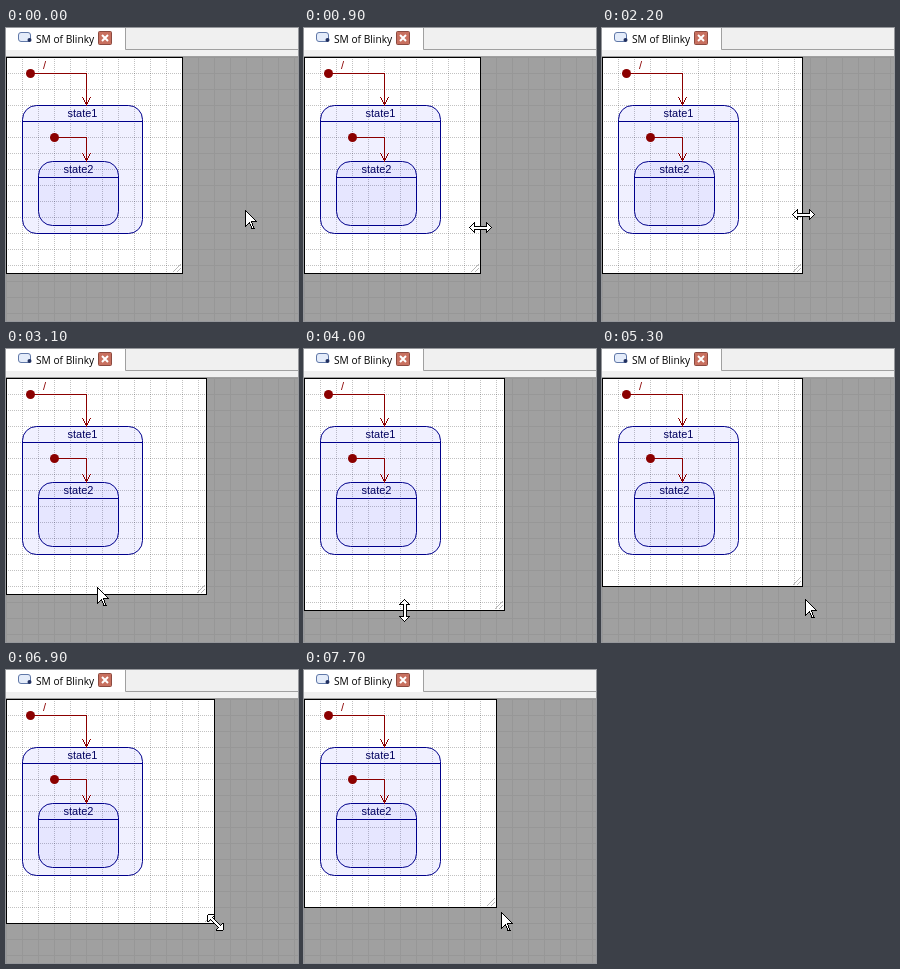
These frames come from a looping animation (292x293 px, 7.8 s). An HTML page:

```html
<!DOCTYPE html>
<html lang="en">
<head>
<meta charset="utf-8">
<title>Resizing a state diagram</title>
<style>
  html, body { margin: 0; width: 100%; height: 100%; overflow: hidden; background: #fff; }
  svg { display: block; width: 292px; height: 293px; }
  text { font: 11px "Liberation Sans", Arial, sans-serif; }
  .tab text { font: 10.2px "Open Sans", sans-serif; }
  .crisp, .cursor, .flow { shape-rendering: crispEdges; }
  .state { fill: #00f; fill-opacity: .06; stroke: #00008b; }
  .inner { fill-opacity: .045; }
  .rule { stroke: #00008b; }
  .name { fill: #000060; text-anchor: middle; }
  .flow { fill: none; stroke: #8b0000; }
  .start { fill: #8b0000; }
  .cursor { fill: #fff; stroke: #000; }
  .grid { stroke: #000; stroke-opacity: .24; stroke-dasharray: 1 1; }
</style>
</head>
<body>
<svg viewBox="0 0 292 293">
  <defs>
    <pattern id="dots" y="29" width="16" height="16" patternUnits="userSpaceOnUse">
      <g class="grid crisp"><path d="M0 .5H16"/><path d="M.5 0V16"/></g>
    </pattern>
    <pattern id="lines" y="29" width="16" height="16" patternUnits="userSpaceOnUse">
      <path class="crisp" d="M0 .5H16M.5 0V16" stroke="#000" stroke-opacity=".06"/>
    </pattern>
    <path id="double" d="M-11 0L-6 -5V-1.5H6V-5L11 0L6 5V1.5H-6V5Z"/>
  </defs>

  <g class="tab">
    <rect width="292" height="28" fill="#f0f0f0"/>
    <rect width="119" height="22" fill="#fff"/>
    <path d="M119.5 0V21.5H292" fill="none" stroke="#a0a0a0"/>
    <rect x="12.5" y="4.5" width="12" height="9" rx="2.5" fill="#e4ecfa" stroke="#6078a8"/>
    <circle cx="23.5" cy="12" r="2" fill="#203060"/>
    <text x="30" y="14.5">SM of Blinky</text>
    <rect x="92.5" y="3.5" width="13" height="13" rx="1" fill="#c8705f" stroke="#8c4a40"/>
    <path d="M96 7l6 6M102 7l-6 6" stroke="#fff" stroke-width="2"/>
  </g>

  <rect y="28" width="292" height="265" fill="#a0a0a0"/>
  <rect y="29" width="292" height="264" fill="url(#lines)"/>
  <rect class="sheet" y="29" fill="#fff"/>
  <rect class="sheet" y="29" fill="url(#dots)"/>
  <rect class="sheet crisp" x=".5" y="29.5" fill="none" stroke="#000"/>
  <path id="grip" d="M-9 -1L-1 -9M-5 -1L-1 -5" stroke="#b8b8b8"/>

  <rect class="state" x="16.5" y="77.5" width="120" height="128" rx="14"/>
  <path class="rule" d="M16.5 93.5H136.5"/>
  <text class="name" x="76.5" y="89">state1</text>
  <rect class="state inner" x="32.5" y="133.5" width="80" height="64" rx="14"/>
  <path class="rule" d="M32.5 149.5H112.5"/>
  <text class="name" x="72.5" y="145">state2</text>

  <path class="flow" d="M24.5 45.5H80.5V77M76.5 69L80.5 77L84.5 69"/>
  <circle class="start" cx="24.5" cy="45.5" r="4.5"/>
  <text class="start" x="37" y="41">/</text>
  <path class="flow" d="M48.5 109.5H80.5V133M76.5 125L80.5 133L84.5 125"/>
  <circle class="start" cx="48.5" cy="109.5" r="4.5"/>

  <g id="pointer" class="cursor">
    <path data-kind="arrow" d="M.5 .5V16.5L4.5 12.5L7 18.5H9L6.5 11.5H11.5Z"/>
    <use data-kind="ew" href="#double" x=".5" y=".5"/>
    <use data-kind="ns" href="#double" transform="translate(.5 .5) rotate(90)"/>
    <use data-kind="nwse" href="#double" transform="translate(.5 1.5) rotate(45)"/>
  </g>
</svg>
<script>
const LOOP = 7800, TICK = 100, TOP = 29, CELL = 8;

// Each leg runs between two ticks to a point. A travel leg shows the arrow
// until it arrives; a drag keeps its grip and resizes the named axes.
const legs = [
  { from: 1, to: 9, x: 176, y: 199, grip: "ew", bow: -12 },
  { from: 12, to: 17, x: 245, y: 180, grip: "ew", drag: "x" },
  { from: 18, to: 23, x: 198, y: 186, grip: "ew", drag: "x" },
  { from: 24, to: 34, x: 100, y: 246, grip: "ns", bow: -17, back: 1.9 },
  { from: 37, to: 42, x: 100, y: 266, grip: "ns", drag: "y" },
  { from: 43, to: 46, x: 99, y: 234, grip: "ns", drag: "y" },
  { from: 49, to: 57, x: 200, y: 236, grip: "nwse", bow: 14, back: 1.2 },
  { from: 59, to: 67, x: 228, y: 266, grip: "nwse", drag: "xy", back: -.2 },
  { from: 67, to: 72, x: 189, y: 236, grip: "nwse", drag: "xy" },
  { from: 75, to: 77, x: 197, y: 242, grip: "arrow" }
];

const snap = v => CELL * Math.round(v / CELL);

// Slows towards the end; a positive back overshoots
function ease(k, back) {
  const u = k - 1;
  return 1 + (back + 1) * u ** 3 + back * u ** 2;
}

function poseAt(tick) {
  const pose = { x: 239, y: 182, w: 176, h: 216, kind: "arrow" };
  for (const { from, to, x, y, grip, drag = "", bow = 0, back = -2 } of legs) {
    if (tick <= from) break;
    const k = Math.min(1, (tick - from) / (to - from));
    const e = ease(k, back);
    pose.x += (x - pose.x) * e;
    pose.y += (y - pose.y) * e + bow * Math.sin(Math.PI * k);
    pose.kind = drag || k === 1 ? grip : "arrow";
    if (drag.includes("x")) pose.w = snap(pose.x);
    if (drag.includes("y")) pose.h = snap(pose.y - TOP);
  }
  return pose;
}

const grip = document.getElementById("grip");
const pointer = document.getElementById("pointer");
const sheets = document.querySelectorAll(".sheet");

function move(el, x, y) {
  el.setAttribute("transform", `translate(${Math.round(x)} ${Math.round(y)})`);
}

function draw(tick) {
  const { x, y, w, h, kind } = poseAt(tick);
  for (const el of sheets) {
    el.setAttribute("width", w);
    el.setAttribute("height", h);
  }
  move(grip, w, TOP + h);
  move(pointer, x, y);
  for (const el of pointer.children) {
    el.style.display = el.dataset.kind === kind ? "" : "none";
  }
}

const begin = performance.now();
function run() {
  draw(Math.floor((performance.now() - begin) % LOOP / TICK));
  requestAnimationFrame(run);
}
run();
</script>
</body>
</html>
```
